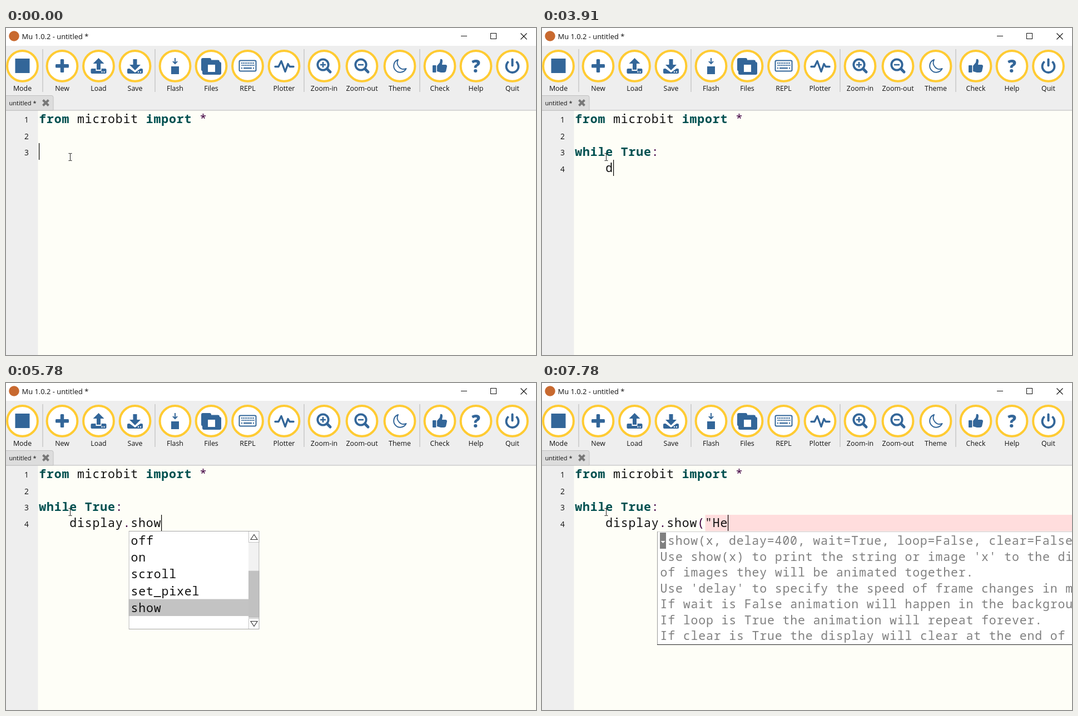
An HTML page with a canvas that plays this animation: 953x588 px, repeating every 8000 ms.

```html
<!DOCTYPE html>
<html lang="en">
<head>
<meta charset="utf-8">
<title>Editor typing</title>
<style>
html, body { margin: 0; width: 100%; height: 100%; overflow: hidden; background: #fefef7; }
canvas { display: block; }
</style>
</head>
<body>
<canvas id="stage" width="953" height="588"></canvas>
<script>
const ctx = document.getElementById('stage').getContext('2d');
const LOOP = 8000, ADV = 13.75, LEFT = 58.8, ROW = 29.5, TOP = 148.5;
const BLUE = '#336699', YELLOW = '#ffcb33', GREY = '#eeeeee', PINK = '#ffdddd';
const KEYWORD = '#005050', OPERATOR = '#400040', INK = '#111111';
const UI = '"Open Sans", "Noto Sans", sans-serif';
const MONO = '"Noto Sans Mono", "DejaVu Sans Mono", monospace';

const LINE3 = 'while True:', LINE4 = '    display.show("He';
const WORD_END = 5, TRUE_END = 10, NEWLINE = 16;

// [time, characters typed]; line 3 fills up to 11, the indented line 4 starts at 16
const KEYS = [
  [0, 0], [350, 1], [430, 2], [580, 3], [750, 4], [900, 5], [1000, 6], [1380, 7],
  [1600, 8], [1840, 9], [2010, 10], [2840, 11], [2920, 16], [3910, 17], [3980, 18],
  [4290, 20], [4370, 21], [4670, 23], [5140, 24], [5210, 25], [5540, 27], [5780, 28],
  [6390, 29], [6860, 30], [7420, 31], [7780, 32]
];
const CARET_OFF = [[40, 350], [2470, 2840], [3680, 3910], [6160, 6390], [6780, 6860], [7350, 7420]];

const NAMES = ['dict', 'difference', 'dir', 'discard', 'display', 'divmod', 'dump'];
const METHODS = ['clear', 'get_pixel', 'is_on', 'off', 'on', 'scroll', 'set_pixel', 'show'];
const TIP = [
  'show(x, delay=400, wait=True, loop=False, clear=False)',
  "Use show(x) to print the string or image 'x' to the display. If 'x' is a list",
  'of images they will be animated together.',
  "Use 'delay' to specify the speed of frame changes in milliseconds.",
  'If wait is False animation will happen in the background.',
  'If loop is True the animation will repeat forever.',
  'If clear is True the display will clear at the end of the animation.'
];

function box(x, y, w, h, color) {
  ctx.fillStyle = color;
  ctx.fillRect(x, y, w, h);
}

function frame(x, y, w, h, color) {
  ctx.strokeStyle = color;
  ctx.lineWidth = 1;
  ctx.strokeRect(x + .5, y + .5, w - 1, h - 1);
}

function rounded(x, y, w, h, r, color) {
  ctx.fillStyle = color;
  ctx.beginPath();
  ctx.roundRect(x, y, w, h, r);
  ctx.fill();
}

function disc(x, y, r, color) {
  ctx.fillStyle = color;
  ctx.beginPath();
  ctx.arc(x, y, r, 0, 7);
  ctx.fill();
}

function ring(x, y, r, width, color, from = 0, to = 2 * Math.PI) {
  ctx.strokeStyle = color;
  ctx.lineWidth = width;
  ctx.beginPath();
  ctx.arc(x, y, r, from, to);
  ctx.stroke();
}

function line(d, color, width, cap = 'butt') {
  ctx.strokeStyle = color;
  ctx.lineWidth = width;
  ctx.lineCap = cap;
  ctx.lineJoin = cap === 'round' ? 'round' : 'miter';
  ctx.stroke(new Path2D(d));
  ctx.lineCap = 'butt';
}

function shape(d, color) {
  ctx.fillStyle = color;
  ctx.fill(new Path2D(d));
}

function label(text, x, y, size, align = 'left', color = INK, weight = 400) {
  ctx.font = `${weight} ${size}px ${UI}`;
  ctx.letterSpacing = '0px';
  ctx.textAlign = align;
  ctx.fillStyle = color;
  ctx.fillText(text, x, y);
}

function mono(text, x, y, color = INK, bold = false) {
  ctx.font = `${bold ? 700 : 400} 21.5px ${MONO}`;
  ctx.letterSpacing = '0.85px';
  ctx.textAlign = 'left';
  ctx.fillStyle = color;
  ctx.fillText(text, x + .4, y);
}

const col = n => LEFT + n * ADV;
const rowTop = r => TOP + (r - 1) * ROW;
const code = (text, c, r, color, bold) => mono(text, col(c), rowTop(r) + 22.3, color, bold);

function tray(x) {
  rounded(x - 14, 73, 28, 9, 2, BLUE);
  disc(x + 6, 79, 1.2, '#fff');
  disc(x + 10, 79, 1.2, '#fff');
}

function lens(x) {
  ring(x - 2, 66, 9.7, 3.8, BLUE);
  line(`M${x + 5.5} 73.5L${x + 11} 79`, BLUE, 5, 'round');
  box(x - 7, 64.8, 10, 2.6, BLUE);
}

const ICONS = [
  ['Mode', 29.5, x => box(x - 13, 55, 26, 26, BLUE)],
  ['New', 101, x => {
    rounded(x - 12, 65, 24, 6.4, 1.5, BLUE);
    rounded(x - 3.2, 56, 6.4, 24, 1.5, BLUE);
  }],
  ['Load', 166.5, x => {
    tray(x);
    box(x - 5, 72, 10, 5, '#fff');
    shape(`M${x} 54l10 10h-6.5v11h-7v-11h-6.5z`, BLUE);
  }],
  ['Save', 232, x => {
    tray(x);
    shape(`M${x - 11} 72h22l-11 8z`, '#fff');
    shape(`M${x} 76l-10-10h6.5v-10h7v10h6.5z`, BLUE);
  }],
  ['Flash', 304, x => {
    line(`M${x} 54v10M${x - 4} 60l4 4l4-4`, BLUE, 2);
    box(x - 7, 69, 14, 14, BLUE);
  }],
  ['Files', 369, x => {
    rounded(x - 18, 54, 18, 12, 3, BLUE);
    rounded(x - 18, 57.5, 33, 20, 3, BLUE);
    rounded(x - 16, 61, 34, 23, 3, BLUE);
    box(x - 6, 66, 13, 13, '#fff');
  }],
  ['REPL', 434.5, x => {
    ctx.strokeStyle = BLUE;
    ctx.lineWidth = 2;
    ctx.beginPath();
    ctx.roundRect(x - 15, 58.5, 30, 19, 2);
    ctx.stroke();
    for (let r = 0; r < 2; r++)
      for (let k = 0; k < 8; k++) box(x - 11.5 + k * 3 + r * .5, 62 + r * 4, 2, 2.2, BLUE);
    box(x - 11.5, 71, 2, 2.2, BLUE);
    box(x - 7.5, 71, 15, 2.2, BLUE);
    box(x + 9.5, 71, 2, 2.2, BLUE);
  }],
  ['Plotter', 500, x => line(`M${x - 16} 69.5h6l5-10l7 19l5-14l3 5h7`, BLUE, 3.4, 'round')],
  ['Zoom-in', 572, x => {
    lens(x);
    box(x - 3.3, 61, 2.6, 10, BLUE);
  }],
  ['Zoom-out', 640, lens],
  ['Theme', 708, x => line(`M${x - 3} 57A11.7 11.7 0 1 0 ${x + 11.5} 73A11.5 11.5 0 0 1 ${x - 3} 57Z`, BLUE, 2, 'round')],
  ['Check', 780, x => {
    rounded(x - 13, 67, 6.5, 13, 1, BLUE);
    shape(`M${x - 5} 68l5-6l1-6q4-1 4 4l-1 6h6q3 0 3 3l-2 9q-1 2-4 2h-5l-7-2z`, BLUE);
  }],
  ['Help', 845, x => label('?', x, 80, 31, 'center', BLUE, 800)],
  ['Quit', 910.5, x => {
    ring(x, 69, 11, 3.8, BLUE, -.9, Math.PI + .9);
    line(`M${x} 56.5v11`, BLUE, 4, 'round');
  }]
];

function drawWindow() {
  box(0, 0, 953, 588, '#fefef7');
  box(0, 0, 953, 32, '#ffffff');
  box(0, 32, 953, 116, GREY);
  box(0, 148, 57.5, 440, GREY);

  disc(14.5, 14.5, 9.3, '#c8692f');
  label('Mu 1.0.2 - untitled *', 28.5, 20, 12.9);
  box(818, 14, 11, 1, INK);
  frame(871, 9, 11, 11, INK);
  line('M925.5 9.5l11 11M936.5 9.5l-11 11', INK, 1.1);

  for (const [name, x, draw] of ICONS) {
    disc(x, 68.4, 28, '#fff');
    ring(x, 68.4, 27.4, 4, YELLOW);
    draw(x);
    label(name, x, 113, 12.4, 'center');
  }
  for (const x of [66, 268, 536, 744]) box(x - .5, 38, 1, 77, '#b4b4b4');

  box(0, 147.5, 953, 1, '#b9b9b9');
  ctx.fillStyle = '#dddddd';
  ctx.strokeStyle = '#c0c0c0';
  ctx.lineWidth = 1;
  ctx.beginPath();
  ctx.roundRect(-5, 121.5, 90, 26.5, [0, 3, 0, 0]);
  ctx.fill();
  ctx.stroke();
  label('untitled *', 5.5, 139, 11.1);
  line('M66.5 129.5l10 10M76.5 129.5l-10 10', '#777777', 4);
}

function drawPopup(x, items, picked, top) {
  const y = 266, w = 235, h = 177, pitch = 30.4, page = 5;
  ctx.save();
  ctx.beginPath();
  ctx.rect(x, y, w, h);
  ctx.clip();
  box(x, y, w, h, '#ffffff');
  items.slice(top, top + 6).forEach((item, i) => {
    if (i + top === picked) box(x, 267 + i * pitch, w, pitch, '#c3c3c3');
    mono(item, x + 3.6, 290.6 + i * pitch);
  });
  if (items.length > page) {
    const bx = x + 215.5, track = 135;
    box(bx, y, 20, h, '#f2f2f2');
    box(bx, 287 + track * top / items.length, 20, track * page / items.length, '#c1c1c1');
    for (const by of [266, 423]) {
      box(bx, by, 20, 20.5, '#ffffff');
      frame(bx, by, 20, 21, '#c4c4c4');
    }
    line(`M${x + 219.5} 281.5h12l-6-9zM${x + 219.5} 428.5h12l-6 9z`, '#333333', 1.1);
  }
  frame(x, y, w, h, '#a6a6a6');
  ctx.restore();
}

function drawTip() {
  box(207, 267, 746, 204, '#ffffff');
  box(207, 267, 746, 1, '#cccccc');
  box(207, 267, 1, 204, '#999999');
  box(207, 470, 746, 1, '#222222');
  box(212, 269, 11, 29, '#808080');
  shape('M213.5 284h8l-4 4z', '#ffffff');
  TIP.forEach((text, i) => mono(text, i ? 212 : 225.5, 291.4 + i * 28.5, '#808080'));
}

function drawCode(n, caretOn) {
  code('from', 0, 1, KEYWORD, true);
  code('microbit', 5, 1);
  code('import', 14, 1, KEYWORD, true);
  code('*', 21, 1, OPERATOR);

  code(LINE3.slice(0, Math.min(n, WORD_END)), 0, 3, n >= WORD_END ? KEYWORD : INK, n >= WORD_END);
  code(LINE3.slice(6, Math.min(n, TRUE_END)), 6, 3, n >= TRUE_END ? KEYWORD : INK, n >= TRUE_END);
  if (n > TRUE_END) code(':', 10, 3, OPERATOR);

  const second = n >= NEWLINE;
  const c = second ? n - NEWLINE + 4 : n;
  if (second) {
    if (c === 17) box(280, 237, 13.5, 29.5, PINK);
    if (c > 17) box(293.5, 237, 660, 29.5, PINK);
    const typed = LINE4.slice(0, c);
    [...typed].forEach((ch, i) => code(ch, i, 4, '.('.includes(ch) ? OPERATOR : INK));
  }
  for (let r = 1; r <= (second ? 4 : 3); r++) label(r, 41, rowTop(r) + 21.5, 13.8, 'right');

  if (caretOn) box(Math.round(col(c)), second ? 237 : 207, 1.2, second ? 29 : 30, '#000000');
}

function drawPointer() {
  line('M112.5 225.5h2.5l.5.5l.5-.5h2.5M115.5 226v12M112.5 238.5h2.5l.5-.5l.5.5h2.5', '#222222', 1);
}

function draw(t) {
  const n = KEYS.findLast(k => k[0] <= t)[1];
  const caretOn = !CARET_OFF.some(([a, b]) => t >= a && t < b);
  drawWindow();
  drawCode(n, caretOn);
  drawPointer();
  if (n === 18) drawPopup(110, NAMES, 0, 0);
  else if (n > 18 && n < 24) drawPopup(110, ['display'], 0, 0);
  else if (n === 24) drawPopup(220.5, METHODS, 0, 0);
  else if (n === 25) drawPopup(220.5, METHODS, 5, 1);
  else if (n > 25 && n < 29) drawPopup(220.5, METHODS, 7, 3);
  else if (n >= 29) drawTip();
}

const start = performance.now();
function tick() {
  draw((performance.now() - start) % LOOP);
  requestAnimationFrame(tick);
}
tick();
</script>
</body>
</html>
```
